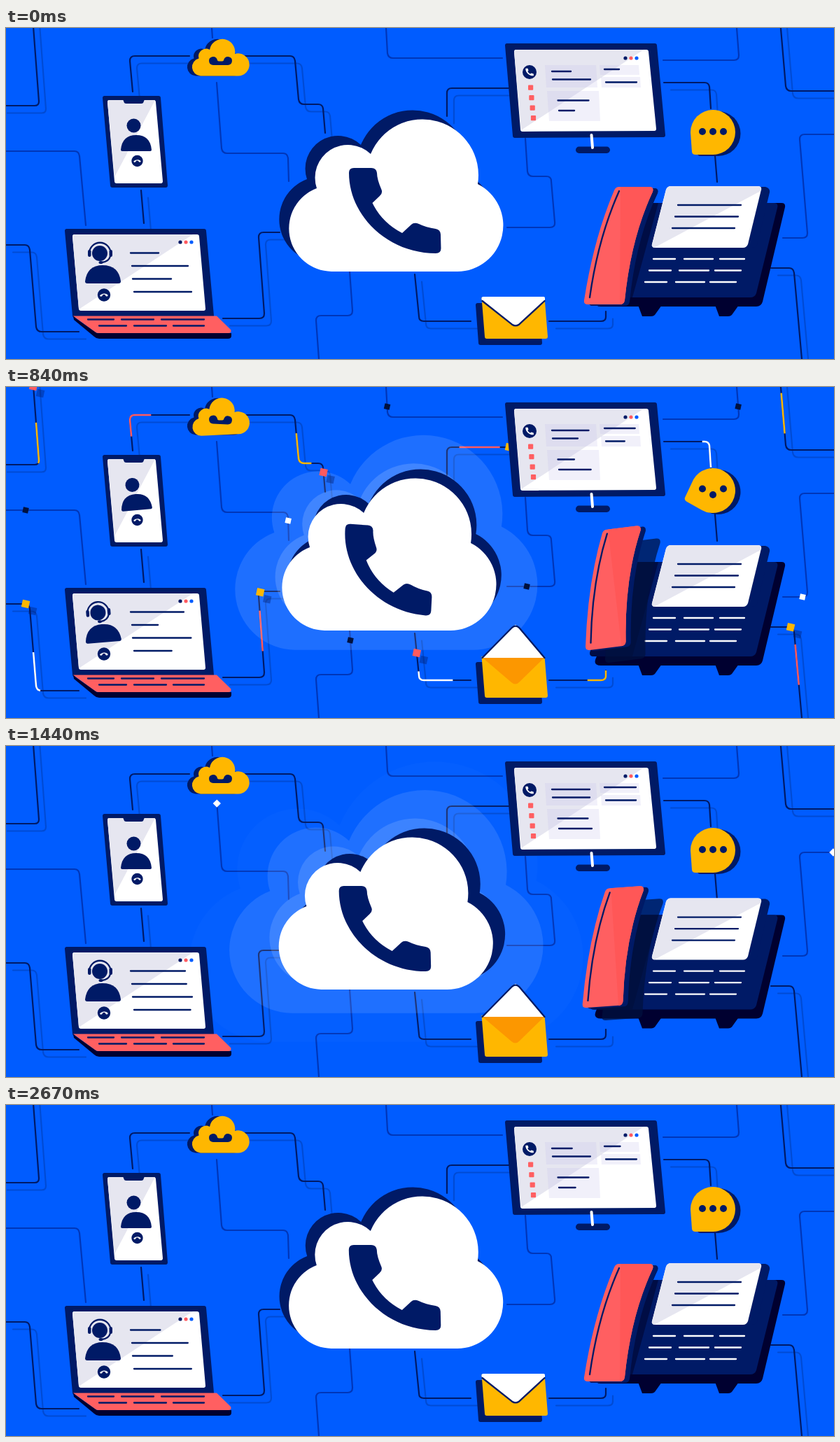
These frames come from a looping animation (1183 px wide and 473 px high, 2.7 s). An HTML page:

```html
<!DOCTYPE html>
<html lang="en">
<head>
<meta charset="utf-8">
<title>Cloud calling</title>
<style>
  html, body { margin: 0; width: 100%; height: 100%; overflow: hidden; background: #005cff; }
  svg { display: block; width: 100%; height: 100%; }
  .n { fill: #001a66; }
  .w { fill: #fff; }
  .g { fill: #e6e6f0; }
  .r { fill: #ff5f61; }
  .y { fill: #ffb700; }
  .d { fill: #000030; }
  .panel { fill: #c4c2ea; fill-opacity: .24; }
  .ln { fill: none; stroke: #001a66; stroke-width: 2.3; stroke-linecap: round; stroke-linejoin: round; }
  .wl { fill: none; stroke: #fff; stroke-width: 2.3; stroke-linecap: round; }
  .soft { stroke-linejoin: round; stroke-width: 6; }
  .n.soft { stroke: #001a66; }
  .w.soft { stroke: #fff; }
  .wire { fill: none; stroke: #001a66; stroke-width: 2.2; stroke-linecap: round; }
  .wire.dim { stroke: #0036b8; }
  .wire.cast { stroke: #004bd4; }
  .trail { fill: none; stroke-width: 2.5; }
</style>
</head>
<body>
<svg viewBox="0 0 1183 473" preserveAspectRatio="none">
  <defs>
    <path id="cloud" d="M465 348A61.500 61.500 0 0 1 444 229A47 47 0 0 1 521 180A80 80 0 0 1 674 223A66 66 0 0 1 645 348Z"/>
    <path id="handset" d="M497 200H522Q529 200 530 207Q530 216 536.500 231Q538.500 236 534 240L523.500 250Q537 278 566 293L579 281Q583 277 590 280Q600 285 614 287Q620.500 288 621 295L621.500 315Q621.500 322 614 322C545 322 490 268 490 207Q490 200 497 200Z"/>
    <path id="puff" d="M278 68.500A12.700 12.700 0 0 1 275.500 43.500A10.800 10.800 0 0 1 291 31A18.100 18.100 0 0 1 327 37A16.100 16.100 0 1 1 331 68.500Z"/>
    <path id="bubble" d="M1010 117A32 32 0 0 1 1010 181H985Q980.500 181 980 177L978 149A32 32 0 0 1 1010 117Z"/>
    <path id="grip" d="M876 227H919Q926 227 924 234Q893 300 884 389Q883 395 877 395H831Q825 395 826 389Q840 300 869 232Q871 227 876 227Z"/>
  </defs>

  <g id="wires"></g>
  <g id="trails"></g>
  <g id="pulses" fill="#fff"></g>
  <g id="dots"></g>

  <!-- main cloud -->
  <use id="cloudBack" href="#cloud" class="n"/>
  <use id="cloudFront" href="#cloud" class="w"/>
  <use id="call" href="#handset" class="n"/>

  <!-- voicemail -->
  <use href="#puff" class="n" x="-7"/>
  <use id="puffTop" href="#puff" class="y"/>
  <path id="voicemail" class="n" d="M296 53A6 6 0 1 1 301.500 44.500Q302 47.500 304 47.500H309Q311 47.500 311.500 44.500A6 6 0 1 1 317 53Z"/>

  <!-- phone -->
  <path class="n soft" d="M141 100H218L228 225H152Z"/>
  <path class="w soft" d="M148 106H211L221 219H158Z"/>
  <path class="g" d="M147 103H213L155 213L145 106Q145 103 147 103Z"/>
  <path class="n" d="M167 102H198L196 107Q195 108 193 108H172Q170 108 169 107Z"/>
  <g id="caller" class="n"><circle cx="182.500" cy="139.500" r="10"/><path d="M164 174Q166 153 186 153Q206 153 208 174Q208 176 206 176H166Q164 176 164 174Z"/></g>
  <g class="hang" transform="translate(187.500 190)"></g>

  <!-- laptop -->
  <path class="n soft" d="M87 290H283L294 411H98Z"/>
  <path class="w soft" d="M98 298H273L282 401H107Z"/>
  <path class="g" d="M98 295H267L104 402L95 298Q95 295 98 295Z"/>
  <path class="d" d="M96 412L130 436H322V440Q322 444 317 444H133Q129 444 126 441L97 417Z"/>
  <path class="r" d="M96 411.500H301L321 431Q323 436 317 436H132Q129 436 127 434Z"/>
  <path class="ln" d="M117 416.500H154M165 416.500H211M222 416.500H283M133 425.500H172M183 425.500H229M239 425.500H283"/>
  <g class="lights" transform="translate(249 306)"></g>
  <g id="agent">
    <circle class="n" cx="134" cy="322" r="11"/>
    <path class="ln" d="M119 322A15.200 15.200 0 0 1 149.500 322M149 326Q147 334 137 335"/>
    <rect class="n" x="117" y="317" width="4.500" height="10" rx="2.200"/><rect class="n" x="147.500" y="317" width="4.500" height="10" rx="2.200"/>
    <ellipse class="n" cx="135.500" cy="335" rx="3" ry="2"/>
    <path class="n" d="M113 362Q116 339 138 339Q161 339 164 362Q164 365 161 365H116Q113 365 113 362Z"/>
  </g>
  <g class="hang" transform="translate(140 381.500) scale(1.120)"></g>

  <!-- monitor -->
  <path class="n soft" d="M716 25H927L939 153L727 154Z"/>
  <path class="w soft" d="M729 34H915L926 144L738 145Z"/>
  <path class="g" d="M729 31H911L736 146L726 34Q726 31 729 31Z"/>
  <path class="panel" d="M770 53H843L845 85H772ZM848 53H904L905 67H849ZM850 70H906L907 85H851ZM773 90H847L849 133H776Z"/>
  <circle class="n" cx="748" cy="63" r="10"/>
  <use href="#handset" class="w" transform="translate(748 63) scale(.088) translate(-555 -261)"/>
  <g id="marks" class="r"></g>
  <g class="lights" transform="translate(885 43)"></g>
  <rect class="n" x="814" y="169.500" width="49" height="9.500" rx="4.700"/>
  <path class="wl" style="stroke-width:4" d="M836.500 153L838 171"/>

  <g id="rows" class="ln"></g>

  <!-- chat -->
  <g id="chat"><use href="#bubble" class="n" id="chatBack"/><use href="#bubble" class="y"/></g>
  <g id="typing" class="n"></g>

  <!-- envelope -->
  <path class="n" d="M671 396Q671 393 674 393H762L766 450Q766 453 763 453H678Q675 453 675 450Z"/>
  <path class="y" d="M679.500 385H769.500L774 441Q774 444 771 444H687Q684 444 684 441Z"/>
  <path d="M681 387H769L733 422Q728 427 722 422Z" fill="#fc9700"/>
  <path id="flap" class="w"/>
  <path id="flapEdge" class="ln"/>

  <!-- desk phone -->
  <g id="desk">
    <path class="d" d="M903 396H937L927 410Q925 412 922 412H909ZM1013 396H1047L1037 410Q1035 412 1032 412H1019Z"/>
    <path class="d" d="M905 250H1108Q1114 250 1113 256L1081 391Q1079 398 1072 398H850Q838 398 843 387Z"/>
    <path class="n" d="M904 250H1097Q1104 250 1102 257L1072 379Q1070 385 1063 385H840Q832 385 835 377L895 256Q898 250 904 250Z"/>
    <path d="M904 250H932L895 385H840Q832 385 835 377L895 256Q898 250 904 250Z" fill="#000d45"/>
    <path class="n" d="M955 227H1085Q1092 229 1091 235L1073 310Q1071 314 1066 314H940Z"/>
    <path class="w" d="M950 226H1074Q1080 226 1079 231L1060 309Q1058 314 1053 314H928Q922 314 923 309L943 231Q945 226 950 226Z"/>
    <path class="g" d="M950 226H1074Q1080 226 1079 231L1078 233L926 314Q922 313 923 309L943 231Q945 226 950 226Z"/>
    <path class="ln" d="M960 253H1050M956 269.500H1046M952 286H1041"/>
    <path class="wl" d="M925 330H956M969 330H1010M1020 330H1055M919 346.500H950M962 346.500H1004M1013 346.500H1050M913 363H944M957 363H998M1006 363H1043"/>
  </g>
  <use id="gripCast" href="#grip" fill="#00113f" fill-opacity=".72"/>
  <g id="gripTop">
    <use href="#grip" class="n" x="7" y="2"/>
    <use href="#grip" class="r"/>
    <path d="M878 227H919Q926 227 924 234Q893 300 884 389Q883 395 877 395Z" fill="#ff5757"/>
    <path class="ln" d="M876 233Q846 300 834 385"/>
  </g>
</svg>

<script>
const LOOP = 2700;
const RED = '#ff5a5f', GOLD = '#ffb700', WHITE = '#fff', NAVY = '#00113f';
const $ = id => document.getElementById(id);

function add(parent, tag, attrs) {
  const el = document.createElementNS('http://www.w3.org/2000/svg', tag);
  for (const k in attrs) el.setAttribute(k, attrs[k]);
  return parent.appendChild(el);
}
const move = (el, x, y, rot = 0, cx = 0, cy = 0) =>
  el.setAttribute('transform', `translate(${x} ${y}) rotate(${rot} ${cx} ${cy})`);

const ramp = (t, from, to) => Math.min(1, Math.max(0, (t - from) / (to - from)));
const bump = (t, from, to) => Math.sin(Math.PI * ramp(t, from, to));
const wave = (t, from, to, turns) => Math.sin(2 * Math.PI * turns * ramp(t, from, to));

// path, trail colour, dot colour, whether the dot runs against the trail
const wires = [
  ['M-8 111H41Q47 111 47 105L37 -29', GOLD, RED, true],
  ['M262 40H184Q177 40 177 47L181 91', RED],
  ['M456 150L453 115Q452 109 446 109H426Q419 109 418 102L413 47Q412 40 406 40H333', GOLD, RED],
  ['M193 232L197 279', WHITE],
  ['M104 434H51Q44 434 43 427L34 317Q33 310 27 310H0', WHITE, GOLD, true],
  ['M391 292H368Q361 292 361 299L369 408Q369 415 362 415H310', RED, GOLD],
  ['M584 352L590 412Q590 419 597 419H664', WHITE, RED],
  ['M776 419H850Q857 419 857 413V405', GOLD],
  ['M630 126V93Q630 86 637 86H747', RED, GOLD, true],
  ['M940 78H998Q1004 78 1005 84L1007 115', WHITE],
  ['M1103 -46L1114 83Q1115 90 1122 90H1183', GOLD, RED],
  ['M1093 343H1119Q1125 343 1126 350L1137 473', RED, GOLD],
];
const dimWires = [
  ['M0 176H98Q104 176 105 183L114 282', NAVY],
  ['M404 219L403 186Q402 179 396 179H316Q309 179 308 172L301 78', WHITE],
  ['M294 0L295 14'],
  ['M543 0L545 36Q546 43 553 43H709', NAVY],
  ['M1044 0L1047 39Q1047 46 1040 46H939', NAVY],
  ['M716 285H777Q785 285 784 277L779 219Q779 212 772 212H753Q746 212 745 205L742 158', NAVY],
  ['M1110 300H1138Q1145 300 1145 293L1134 159Q1134 152 1141 152H1183', WHITE],
  ['M490 334L495 404Q495 411 488 411H450Q443 411 443 418L447 473', NAVY],
];
const TRAIL = 58;
const trails = [], dots = [];

function addDot(path, fill, size, cast, back) {
  if (!fill) return;
  const box = { x: -size / 2, y: -size / 2, width: size, height: size };
  const shade = cast && add($('dots'), 'rect', { ...box, fill: '#001a66', 'fill-opacity': .38 });
  const el = add($('dots'), 'rect', { ...box, fill });
  dots.push({ path, back, el, shade, length: path.getTotalLength() });
}
for (const [d] of wires)
  add($('wires'), 'path', { d, class: 'wire cast', transform: 'translate(10 10.500)' });
for (const [d, dot] of dimWires)
  addDot(add($('wires'), 'path', { d, class: 'wire dim' }), dot, 8, false);
for (const [d, stroke, dot, back] of wires) {
  const path = add($('wires'), 'path', { d, class: 'wire' });
  trails.push(add($('trails'), 'path', { d, stroke, class: 'trail', 'stroke-dasharray': `${TRAIL} 9999` }));
  addDot(path, dot, 10.5, true, back);
}
add($('wires'), 'path', { d: 'M1013 182L1016 220', class: 'wire' });

const pulses = Array.from({ length: 6 }, () => add($('pulses'), 'use', { href: '#cloud' }));

// x, y, shortest, longest; rows alternate between growing once and shrinking twice
const rows = [
  [780, 62, 27, 54], [781, 73.5, 33, 54],
  [855, 59, 21, 45], [857, 77.5, 24, 44],
  [790, 118, 22, 47], [788.5, 103.5, 20, 44],
  [178, 321.5, 40, 78], [180, 340, 30, 80],
  [181, 358.5, 55, 85], [183, 377, 49, 82],
].map(row => [...row, add($('rows'), 'path', {})]);

const typing = [0, 1, 2].map(i => add($('typing'), 'circle', { cx: 995 + 15 * i, cy: 148, r: 5 }));

for (const g of document.querySelectorAll('.lights'))
  ['#001a66', RED, '#005cff'].forEach((fill, i) => add(g, 'circle', { cx: i * 8, cy: 0, r: 2.6, fill }));
for (const g of document.querySelectorAll('.hang')) {
  add(g, 'circle', { r: 8.2, class: 'n' });
  add(g, 'use', { href: '#handset', class: 'w', transform: 'rotate(135) scale(.06) translate(-548 -268)' });
}
for (let i = 0; i < 4; i++)
  add($('marks'), 'rect', { x: 746 + 1.3 * i, y: 81.5 + 14.5 * i, width: 7.2, height: 7.2, rx: 1 });

function drawCloud(t) {
  const u = 1 - Math.abs(t / 1350 - 1);
  const sway = .6 * u + .2 * (1 - Math.cos(Math.PI * u));
  const ring = wave(t, 300, 960, 1.5);
  move($('cloudFront'), -15.3 * sway, 0);
  move($('cloudBack'), -14 + 17.5 * sway, -13);
  move($('call'), -15 * sway, 0, 4.5 * ring, 555, 261);
  move($('caller'), 0, 0, -5 * ring, 186, 163);
  move($('agent'), 0, 0, -5 * ring, 138, 352);

  pulses.forEach((el, i) => {
    const age = t - 533 - 280 * i, p = ramp(age, 0, 660);
    const peak = .15 * (1 - (i / 6) ** 3);
    el.setAttribute('opacity', p > 0 ? peak * (1 - p * p) : 0);
    el.setAttribute('transform', `translate(543.5 222) scale(${1 + .41 * Math.max(0, age) / 307}) translate(-557.5 -239)`);
  });
}

function drawWires(t) {
  for (const el of trails) el.setAttribute('stroke-dashoffset', TRAIL - .264 * (t - 414));

  const s = .33 * (t - 756);
  const turn = 22 + 23 * (t - 1020) / 420;
  for (const { path, back, el, shade, length } of dots) {
    const show = s >= 0 && s <= length ? 'inline' : 'none';
    const p = path.getPointAtLength(back ? length - s : s);
    el.style.display = show;
    move(el, p.x, p.y, turn);
    if (shade) {
      shade.style.display = show;
      move(shade, p.x + 10, p.y + 10, turn);
    }
  }
}

function drawRows(t) {
  const grow = 1 - Math.abs(1 - 2 * t / LOOP) ** 3;
  const dip = (1 + Math.cos(4 * Math.PI * t / LOOP)) / 2;
  rows.forEach(([x, y, min, max, el], i) =>
    el.setAttribute('d', `M${x} ${y}h${min + (max - min) * (i % 2 ? dip : grow)}`));
}

function drawMessages(t) {
  move($('puffTop'), 0, 0, -5 * bump(t, 300, 960), 306, 46);
  move($('voicemail'), 0, 0, -10 * wave(t, 300, 1300, 1), 306.5, 47);

  const turn = 34 * bump(t, 240, 1140), a = -turn * Math.PI / 180;
  move($('chat'), 0, -turn / 30, turn, 1010, 149);
  // keep the shadow on the same side while the bubble turns
  move($('chatBack'), 7.5 * Math.cos(a) - 2 * Math.sin(a), 7.5 * Math.sin(a) + 2 * Math.cos(a));
  typing.forEach((el, i) => move(el, 0, 6 * bump(t, 300, 1320) * Math.cos(2 * (i - 1))));

  const tip = 427 - 87.5 * (ramp(t, 260, 760) - ramp(t, 1780, 2260));
  const open = tip < 386;
  const hinge = open ? 387 : 390;
  const near = tip + (hinge - tip) * .09;
  $('flap').setAttribute('d', open
    ? `M680 387L728 ${tip}L770 387Z`
    : `M679.500 386Q679.500 384 682 384H768Q770 384 770 386V390L733 ${near}Q728 ${tip} 723 ${near}L680 390Z`);
  $('flapEdge').setAttribute('d', `M680.500 ${hinge}L723 ${near}Q728 ${tip} 733 ${near}L769.500 ${hinge}`);
}

function drawDesk(t) {
  const lift = ramp(t, 300, 630) - ramp(t, 1440, 1800);
  const tilt = 8 * bump(t, 400, 860) - 17 * bump(t, 720, 1500);
  const x = -8 * lift, y = -24 * lift;
  move($('desk'), 0, -8.5 * bump(t, 1100, 1740));
  move($('gripTop'), x, y, tilt, 877, 309);
  move($('gripCast'), x + 7 + 21 * lift, y + 2 + 16 * lift, tilt, 877, 309);
}

function render(t) {
  drawCloud(t);
  drawWires(t);
  drawRows(t);
  drawMessages(t);
  drawDesk(t);
}

const begin = performance.now();
function frame() {
  render((performance.now() - begin) % LOOP);
  requestAnimationFrame(frame);
}
render(0);
requestAnimationFrame(frame);
</script>
</body>
</html>
```
